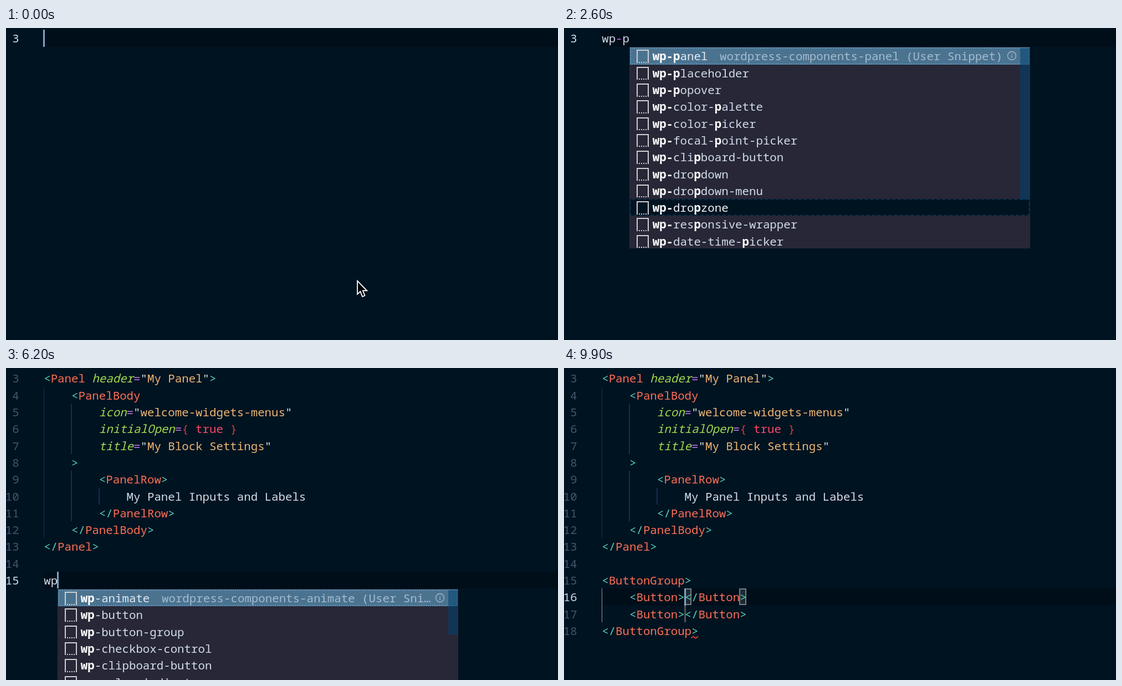
Animation, 996 px wide and 562 px high, one loop 10 s. Source, as an HTML page:

```html
<!DOCTYPE html>
<html lang="en">
<head>
<meta charset="utf-8">
<title>Snippet completion</title>
<style>
html, body { margin: 0; width: 100%; height: 100%; overflow: hidden; background: #001321; }
#stage { position: relative; width: 996px; height: 562px; overflow: hidden; color: #d3dcea;
  font: 20.75px/30.3px "Noto Sans Mono", "DejaVu Sans Mono", monospace; font-variant-ligatures: none; }
#stage div, svg { position: absolute; box-sizing: border-box; white-space: pre; }
i { font-style: normal; }
.b { color: #55d0bb; } .n { color: #fb7054; } .a { color: #a0d94e; font-style: italic; }
.o { color: #c074ea; } .s { color: #ecb673; } .q { color: #dcebe6; }
.c { color: #d23c3c; } .k { color: #fb4a68; }
.num { width: 40px; left: -16.4px; text-align: right; color: #40566a; }
.num.on { color: #c2def2; }
.now { left: 67px; right: 0; height: 30.3px; background: #000e1a; border-radius: 4px 0 0 4px; }
.guide { width: 1.6px; margin-left: -.6px; background: #142f55; }
.guide.on { background: #8b9aa8; }
.caret { width: 3.2px; height: 30.3px; margin-left: -1px; background: #80a4c5; }
.caret.extra { background: #54524f; }
.match { width: 13px; height: 30px; margin-left: -1px; border: 2px solid #747d82; background: #1b2b36; }
#stage .menu { width: 723px; height: 362.6px; overflow: hidden; background: #272737; border: 1px solid #2a2a3b; }
#stage .row { position: relative; display: flex; height: 30.3px; padding: 0 47px 0 40.7px; }
.row b { color: #fff; }
.row.hover { background: #001321; color: #f0f4f8; outline: 2px dashed #0a2a40; outline-offset: -2px; border-radius: 4px; }
.row.sel { background: #4b7390; color: #e2eaf2; outline: 2px dotted #5f9abf; outline-offset: -2px; }
.row .icon { left: 11.7px; top: 4px; width: 22px; height: 23.5px; border: 2px solid #cfcfd2; border-bottom-style: dotted; }
.detail { margin-left: 21.7px; min-width: 0; overflow: hidden; text-overflow: ellipsis; color: #a3bccf; }
.row svg { left: 680px; top: 6px; fill: none; stroke: #a3bccf; stroke-width: 1.3; }
.bar { right: 0; top: 1px; width: 17px; background: rgba(0, 64, 111, .55); }
</style>
</head>
<body>
<div id="stage"></div>
<script>
const CHAR = 12.45, LINE = 30.3, TOP = 3.4, LEFT = 68.2, LOOP = 10000;
const stage = document.getElementById('stage');

const panel = `<Panel header="My Panel">
    <PanelBody
        icon="welcome-widgets-menus"
        initialOpen={ true }
        title="My Block Settings"
    >
        <PanelRow>
            My Panel Inputs and Labels
        </PanelRow>
    </PanelBody>
</Panel>`;
const group = `<ButtonGroup>
    <Button></Button>
    <Button></Button>
</ButtonGroup>`;

const menus = {
  all: { bar: 80, items: 'animate button button-group checkbox-control clipboard-button color-indicator color-palette color-picker dashicon date-time-picker disabled draggable' },
  p: { bar: 273, items: 'panel placeholder popover color-palette color-picker focal-point-picker clipboard-button dropdown dropdown-menu dropzone responsive-wrapper date-time-picker' },
  b: { bar: 362, items: 'button button-group icon-button keyboard-shortcuts clipboard-button disabled' }
};

// Each step: start time, text, typed query, menu name, selected row
const below = panel + '\n\n';
const steps = [
  [0, ''], [1300, 'w'], [1500, 'wp', 'wp', 'all'], [1900, 'wp-', 'wp-', 'all'], [2100, 'wp-p', 'wp-p', 'p'],
  [3000, panel], [4000, panel + '\n'], [4200, below],
  [5800, below + 'w'], [6000, below + 'wp', 'wp', 'all'], [6300, below + 'wp-', 'wp-', 'all'],
  [6500, below + 'wp-b', 'wp-b', 'b'], [7300, below + 'wp-b', 'wp-b', 'b', 1],
  [7900, below + group]
];

const syntax = /(?<b><\/?|>)|(?<n>(?<=<\/?)\w+)|(?<a>\w+(?==))|(?<o>=|(?<=^wp)-)|(?<s>(?<=")[^"]+(?="))|(?<q>")|(?<c>[{}])|(?<k>\btrue\b)/g;
const paint = line => line.replace(syntax, (word, ...rest) => {
  const groups = rest.pop();
  const kind = Object.keys(groups).find(key => groups[key]);
  return `<i class="${kind}">${word.replace('<', '&lt;')}</i>`;
});

const x = col => LEFT + col * CHAR;
const y = row => TOP + row * LINE;
const box = (cls, style, html = '') => `<div class="${cls}" style="${style}">${html}</div>`;
const at = (col, row) => `left:${x(col)}px;top:${y(row)}px`;
const guide = (col, from, to, cls = '') =>
  box('guide ' + cls, `${at(col, from)};height:${(to - from + 1) * LINE}px`);

// Bold the typed prefix and the first later occurrence of the filter letter
function mark(label, query) {
  const start = Math.min(query.length, 3);
  let tail = label.slice(start);
  if (query[3]) tail = tail.replace(query[3], '<b>$&</b>');
  return `<b>${label.slice(0, start)}</b>${tail}`;
}

function menuHtml(name, query, sel, col, row) {
  const { bar, items } = menus[name];
  const rows = items.split(' ').map((item, i) => {
    const chosen = i === sel;
    const detail = chosen ? `<span class="detail">wordpress-components-${item} (User Snippet)</span>
<svg width="18" height="18"><circle cx="9" cy="9" r="7.5"/><path d="M9 8v5M9 5v1.6"/></svg>` : '';
    return box('row' + (chosen ? ' sel' : i === 9 ? ' hover' : ''), '',
      `<div class="icon"></div><span>${mark('wp-' + item, query)}</span>${detail}`);
  }).join('');
  return box('menu', at(col, row + 1) + ';margin-top:.8px', rows + box('bar', `height:${bar}px`));
}

const pointer = `<svg style="left:630px;top:450px" width="28" height="40">
<path d="M4 5.5V29.5L9.4 24.6L13 33.8L17.4 32L13.8 23.2H21.2Z" fill="#000" stroke="#fff" stroke-width="1.8"/></svg>`;
const squiggle = `<svg style="left:229px;top:481px" width="14" height="8">
<path d="M.5 5.5L4 2.5L8.5 6L13 2.5" fill="none" stroke="#e8443c" stroke-width="1.6"/></svg>`;

function view(t) {
  const [start, text, query, menu, sel = 0] = steps.filter(step => step[0] <= t).pop();
  const lines = text.split('\n');
  const done = text.endsWith(group);
  const row = done ? 13 : lines.length - 1;
  const col = done ? 12 : lines[row].length;

  let html = box('now', `top:${y(row)}px`);
  if (lines.length > 1)
    html += guide(0, 1, 9) + guide(4, 2, 4) + guide(4, 6, 8) + guide(8, 7, 7);
  if (done)
    html += guide(0, 13, 14, 'on') + box('match', at(12, 13)) + box('match', at(20, 13));
  lines.forEach((line, i) => {
    html += box('num' + (i === row ? ' on' : ''), `top:${y(i)}px`, i + 3) + box('', at(0, i), paint(line));
  });
  if (Math.floor((t - start) / 500) % 2 === 0) {
    html += box('caret', at(col, row));
    if (done) html += box('caret extra', at(col, row + 1));
  }
  if (menu) html += menuHtml(menu, query, sel, col, row);
  if (t < 200) html += pointer;
  if (t >= 9000) html += squiggle;
  return html;
}

let shown;
function tick() {
  const html = view(performance.now() % LOOP);
  if (html !== shown) stage.innerHTML = shown = html;
  requestAnimationFrame(tick);
}
tick();
</script>
</body>
</html>
```
